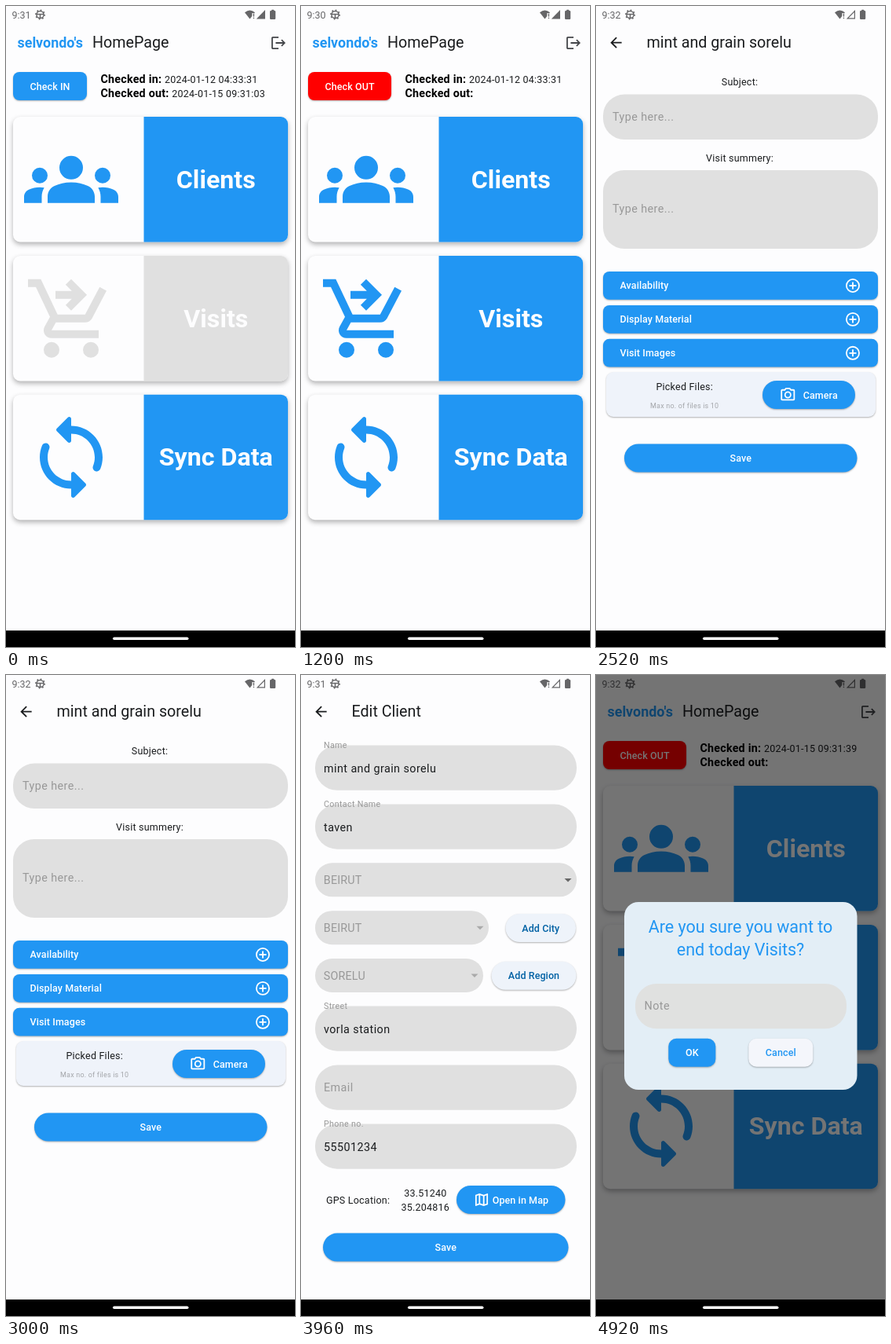
Recreate the animation shown at these times as an HTML page with a canvas. Size 368 px wide and 816 px high, loop 5.16 s.

```html
<!DOCTYPE html>
<html lang="en">
<head>
<meta charset="utf-8">
<title>Client visits app</title>
<style>
  html, body { margin: 0; width: 100%; height: 100%; overflow: hidden; background: #fdfdfe; }
  canvas { display: block; width: 368px; height: 816px; }
</style>
</head>
<body>
<canvas id="stage"></canvas>
<script>
const W = 368, H = 816, NAV_TOP = 795, LOOP = 5160;
const BLUE = '#2196f3', FIELD = '#e0e0e0', PAGE = '#fdfdfe', INK = '#1a1c1e', HINT = '#989898';
const SHOP = 'mint and grain sorelu', CONTACT = 'taven', PHONE = '55501234';

const canvas = document.getElementById('stage');
const ctx = canvas.getContext('2d');
const ratio = window.devicePixelRatio || 1;
canvas.width = W * ratio;
canvas.height = H * ratio;

// Icon outlines on a 24-unit grid
const ICONS = {
  logout: 'M17 7l-1.41 1.41L18.17 11H8v2h10.17l-2.58 2.58L17 17l5-5zM4 5h8V3H4c-1.1 0-2 .9-2 2v14c0 1.1.9 2 2 2h8v-2H4z',
  back: 'M20 11H7.83l5.59-5.59L12 4l-8 8 8 8 1.41-1.41L7.83 13H20z',
  leader: 'M12 12.75c1.63 0 3.07.39 4.24.9 1.08.48 1.76 1.56 1.76 2.73V18H6v-1.61c0-1.18.68-2.26 1.76-2.73 1.17-.52 2.61-.91 4.24-.91zM12 6a3 3 0 0 1 0 6a3 3 0 0 1 0-6z',
  member: 'M4 9a2 2 0 0 1 0 4a2 2 0 0 1 0-4zM5.13 14.1C4.76 14.04 4.39 14 4 14c-.99 0-1.93.21-2.78.58C.48 14.9 0 15.62 0 16.43V18h4.5v-1.61c0-.83.23-1.61.63-2.29z',
  cart: 'M7 18a2 2 0 0 1 0 4a2 2 0 0 1 0-4zM17 18a2 2 0 0 1 0 4a2 2 0 0 1 0-4zM8.1 13h7.45c.75 0 1.41-.41 1.75-1.03L21 4.96 19.25 4l-3.7 7H8.53L4.27 2H1v2h2l3.6 7.59-1.35 2.44C4.52 15.37 5.48 17 7 17h12v-2H7zM12 2l4 4-4 4-1.41-1.41L12.17 7H8V5h4.17l-1.59-1.59z',
  syncHalf: 'M12 4V2.21c0-.45-.54-.67-.85-.35l-2.8 2.79c-.2.2-.2.51 0 .71l2.79 2.79c.32.31.86.09.86-.36V6c3.31 0 6 2.69 6 6 0 .79-.15 1.56-.44 2.25-.15.36-.04.77.23 1.04.51.51 1.37.33 1.64-.34.37-.91.57-1.91.57-2.95 0-4.42-3.58-8-8-8z',
  search: 'M15.5 14h-.79l-.28-.27a6.5 6.5 0 1 0-.7.7l.27.28v.79l5 4.99L20.49 19zM9.5 14a4.5 4.5 0 1 1 0-9a4.5 4.5 0 0 1 0 9z',
  person: 'M19 3H5a2 2 0 0 0-2 2v14a2 2 0 0 0 2 2h14a2 2 0 0 0 2-2V5a2 2 0 0 0-2-2zM19 19H5V5h14zM12 12a3 3 0 1 0 0-6a3 3 0 0 0 0 6zM18 16.6c0-2-4-3.1-6-3.1s-6 1.1-6 3.1V18h12z',
  add: 'M13 7h-2v4H7v2h4v4h2v-4h4v-2h-4zM12 2a10 10 0 1 0 0 20a10 10 0 1 0 0-20zM12 20a8 8 0 1 1 0-16a8 8 0 1 1 0 16z',
  camera: 'M20 4h-3.17L15 2H9L7.17 4H4a2 2 0 0 0-2 2v12a2 2 0 0 0 2 2h16a2 2 0 0 0 2-2V6a2 2 0 0 0-2-2zM20 18H4V6h4.05l1.83-2h4.24l1.83 2H20zM12 7a5 5 0 1 0 0 10a5 5 0 0 0 0-10zM12 15a3 3 0 1 1 0-6a3 3 0 0 1 0 6z',
  map: 'M20.5 3l-.16.03L15 5.1 9 3 3.36 4.9c-.21.07-.36.25-.36.48V20.5c0 .28.22.5.5.5l.16-.03L9 18.9l6 2.1 5.64-1.9c.21-.07.36-.25.36-.48V3.5c0-.28-.22-.5-.5-.5zM10 5.47l4 1.4v11.66l-4-1.4zM5 6.46l3-1.01v11.7l-3 1.16zM19 17.54l-3 1.01V6.86l3-1.16z'
};
for (const name in ICONS) ICONS[name] = new Path2D(ICONS[name]);

function icon(name, cx, cy, color, size = 21.5, transform) {
  ctx.save();
  ctx.translate(cx, cy);
  ctx.scale(size / 24, size / 24);
  if (transform) ctx.transform(...transform);
  ctx.translate(-12, -12);
  ctx.fillStyle = color;
  ctx.fill(ICONS[name], 'evenodd');
  ctx.restore();
}

// Text styles: [size, weight, letter spacing]
const BODY = [12.5, 400, 0.22], BOLD = [14.3, 700, 0.22], INPUT = [14.3, 400, 0.45],
  PLAIN = [14.3, 400, 0.2], BUTTON = [12.5, 500, 0.09], TITLE = [19.7, 400, 0],
  LABEL = [10.7, 400, 0.34];

function text(str, x, y, [size, weight, spacing], color = INK, align = 'left') {
  ctx.font = `${weight} ${size}px Roboto, sans-serif`;
  ctx.letterSpacing = spacing + 'px';
  ctx.textAlign = align;
  ctx.fillStyle = color;
  ctx.fillText(str, x, y);
  return ctx.measureText(str).width;
}

function box(x, y, w, h, r, color, shadow = 0) {
  ctx.save();
  if (shadow) {
    ctx.shadowColor = 'rgba(0,0,0,.3)';
    ctx.shadowBlur = shadow * 2 * ratio;
    ctx.shadowOffsetY = shadow * ratio;
  }
  ctx.fillStyle = color;
  ctx.beginPath();
  ctx.roundRect(x, y, w, h, r);
  ctx.fill();
  ctx.restore();
}

function shape(color, points) {
  ctx.fillStyle = color;
  ctx.beginPath();
  points.forEach(([x, y]) => ctx.lineTo(x, y));
  ctx.closePath();
  ctx.fill();
}

function button(label, x, y, w, { r = 18, fill = BLUE, color = '#fff', shadow = 1 } = {}) {
  box(x, y, w, 36, r, fill, shadow);
  text(label, x + w / 2, y + 22.5, BUTTON, color, 'center');
}

function iconButton(name, label, x, y, w, iconX, labelX) {
  box(x, y, w, 36, 18, BLUE, 1);
  icon(name, iconX, y + 18, '#fff');
  text(label, labelX, y + 22.5, BUTTON, '#fff');
}

const dropArrow = (x, y, color) => shape(color, [[x - 4.5, y - 2.2], [x + 4.5, y - 2.2], [x, y + 2.3]]);

function statusBar(time, fullSignal) {
  const gray = '#666668';
  text(time, 7.5, 16, [12.5, 400, 0], gray);
  ctx.strokeStyle = gray;
  ctx.lineWidth = 1.5;
  ctx.beginPath();
  ctx.arc(43.5, 11, 4.6, 0, 7);
  ctx.moveTo(39, 10.5); ctx.lineTo(48, 10.5);
  ctx.moveTo(43.5, 11); ctx.lineTo(43.5, 15.5);
  ctx.stroke();
  ctx.lineWidth = 1.6;
  ctx.setLineDash([1.7, 2.7]);
  ctx.beginPath();
  ctx.arc(43.5, 11, 5.7, 0, 2 * Math.PI);
  ctx.stroke();
  ctx.setLineDash([]);

  ctx.fillStyle = gray;
  ctx.beginPath();
  ctx.moveTo(310.5, 16.5);
  ctx.lineTo(304, 8.2);
  ctx.quadraticCurveTo(310.5, 3, 317, 8.2);
  ctx.fill();
  box(313.4, 9, 4, 8, 0, PAGE);
  box(314.8, 9.5, 1.3, 4, 0, gray);
  box(314.8, 14.7, 1.3, 1.4, 0, gray);

  shape(gray, [[330, 5], [330, 16.5], [318.8, 16.5]]);
  if (!fullSignal) shape(PAGE, [[328.8, 8], [328.8, 15.3], [321.7, 15.3]]);
  box(336, 6, 7.2, 11, 1.2, gray);
  box(338, 4.8, 3.2, 2, 0.4, gray);
}

function navBar() {
  box(0, NAV_TOP, W, H - NAV_TOP, 0, '#000');
  box(136, 803.4, 96.5, 3.6, 1.8, '#fff');
}

function pageHead(title) {
  icon('back', 25.5, 46.7, INK);
  text(title, 64.5, 53.2, TITLE);
}

function menuCard(y, label, color, drawIcon) {
  box(9, y, 350, 159.5, 9, PAGE, 3);
  box(175.5, y, 183.5, 159.5, [0, 9, 9, 0], color);
  text(label, 267.3, y + 90.7, [32.2, 700, 0], PAGE, 'center');
  drawIcon(83, y + 79.8, color);
}

function groupIcon(x, y, color) {
  icon('leader', x, y, color, 120);
  icon('member', x, y, color, 120);
  icon('member', x, y, color, 120, [-1, 0, 0, 1, 0, 0]);
}

function syncIcon(x, y, color) {
  icon('syncHalf', x, y, color, 120);
  icon('syncHalf', x, y, color, 120, [-1, 0, 0, -1, 0, 0]);
}

function stamp(label, value, x, y) {
  const w = text(label + ' ', x, y, BOLD, '#000');
  text(value, x + w, y, BODY);
}

function home({ time, working, checkedIn, checkedOut = '', fullSignal }) {
  statusBar(time, fullSignal);
  const w = text("selvondo's", 14.5, 53, [17.9, 700, 0], BLUE);
  text('HomePage', Math.max(110, 14.5 + w + 5), 53.2, TITLE);
  icon('logout', 347, 47, '#44464a');
  if (working) button('Check OUT', 9, 84, 106, { r: 8, fill: '#f00' });
  else button('Check IN', 9, 84, 94, { r: 8 });
  const x = working ? 132.5 : 120.5;
  stamp('Checked in:', checkedIn, x, 97.7);
  stamp('Checked out:', checkedOut, x, 115.7);
  menuCard(141, 'Clients', BLUE, groupIcon);
  menuCard(318, 'Visits', working ? BLUE : FIELD, (cx, cy, c) => icon('cart', cx, cy, c, 120));
  menuCard(494.7, 'Sync Data', BLUE, syncIcon);
}

const CLIENTS = [
  [19761, SHOP, CONTACT, 'BEIRUT', PHONE, 1],
  [19760, "dera's shop", 'zeno malt', 'BEIRUT', '55501187', 1],
  [19759, 'le brambolier', 'dovim Al torsen', 'BEIRUT', '55501462', 1],
  [19756, 'tobrin shop', 'milsa', 'BEIRUT', '55501093', 3],
  [19755, 'bena torlo.co', 'hazrel torlo', 'BAABDA', '55501348', 1]
];

function clientCard([id, name, contact, city, phone, status], i) {
  const y = 192 + i * 132;
  box(9, y, 350, 115.3, 9, PAGE, 2.5);
  icon('person', 41, y + 49.3, INK);
  text(id, 41.3, y + 73.7, BODY, INK, 'center');
  text(name, 72, y + 19, BOLD, '#000');
  text('Contact: ' + contact, 72, y + 45, BOLD, '#000');
  text('Location: ' + city, 71.5, y + 71, BODY);
  text('Phone no.: ' + phone, 71.5, y + 89, BODY);
  text('Status: ' + status, 71.5, y + 106.7, BODY);
  ctx.strokeStyle = BLUE;
  ctx.lineWidth = 2.2;
  ctx.beginPath();
  ctx.moveTo(339.8, y + 50);
  ctx.lineTo(348, y + 58.5);
  ctx.lineTo(339.8, y + 67);
  ctx.stroke();
}

function clientList() {
  statusBar('9:31', true);
  pageHead('Clients Page');
  button('Add Client', 249, 29, 101);
  box(9, 81, 350, 51.3, 25.6, FIELD);
  box(13, 84.7, 43.5, 43.5, 21.8, BLUE);
  icon('search', 35, 106.5, '#fff', 18);
  text('Search here...', 61, 111.5, PLAIN, '#5c5c5c');
  text('Sort By', 257.3, 167.3, PLAIN, '#666');
  dropArrow(339.5, 163, '#666');
  CLIENTS.forEach(clientCard);
}

function visitForm() {
  statusBar('9:32', false);
  pageHead(SHOP);
  text('Subject:', 183, 101, BODY, INK, 'center');
  box(9, 112.6, 350, 57.4, 27, FIELD);
  text('Type here...', 21, 146, INPUT, HINT);
  text('Visit summery:', 183, 197.5, BODY, INK, 'center');
  box(9, 209, 350, 100, 27, FIELD);
  text('Type here...', 21, 263.2, INPUT, HINT);
  ['Availability', 'Display Material', 'Visit Images'].forEach((label, i) => {
    const y = 338 + i * 42.9;
    box(9, y, 350, 35.8, 8, BLUE, 1);
    text(label, 30.5, y + 22.3, BUTTON, '#fff');
    icon('add', 327, y + 18, '#fff');
  });
  box(13, 466, 343, 57, 9, '#eff3fa', 1);
  text('Picked Files:', 112.7, 489, BODY, INK, 'center');
  text('Max no. of files is 10', 112.7, 511.8, [8.95, 400, 0.22], '#a4a6aa', 'center');
  iconButton('camera', 'Camera', 212, 477, 118, 244.3, 263.7);
  button('Save', 36, 557.5, 296.5);
}

function input(y, label, value) {
  box(18, y, 333, 57.2, 28, FIELD);
  if (value) {
    text(label, 29, y + 3.7, LABEL, HINT);
    text(value, 29, y + 34, INPUT);
  } else {
    text(label, 29, y + 33.2, INPUT, HINT);
  }
}

function dropdown(y, w, value, arrowColor) {
  box(18, y, w, 43, 21.5, FIELD);
  text(value, 28.8, y + 26.7, PLAIN, HINT);
  dropArrow(18 + w - 11, y + 21.8, arrowColor);
}

function editClient() {
  const tonal = { fill: '#eef3fa', color: '#0061a4' };
  statusBar('9:31', false);
  pageHead('Edit Client');
  input(89.6, 'Name', SHOP);
  input(164.5, 'Contact Name', CONTACT);
  dropdown(239.3, 333, 'BEIRUT', '#666');
  dropdown(300.2, 221, 'BEIRUT', '#aaa');
  dropdown(361, 214, 'SORELU', '#aaa');
  button('Add City', 260.5, 304, 89.5, tonal);
  button('Add Region', 242.5, 364.8, 108, tonal);
  input(421.5, 'Street', 'vorla station');
  input(496.5, 'Email');
  input(571.5, 'Phone no.', PHONE);
  text('GPS Location:', 32, 672.5, BODY);
  text('33.51240', 158.3, 663.5, BODY, INK, 'center');
  text('35.204816', 158.3, 681.5, BODY, INK, 'center');
  iconButton('map', 'Open in Map', 198, 650, 138.5, 230, 243.7);
  button('Save', 28, 710.6, 312.5);
}

function endDialog() {
  home({ time: '9:32', working: true, checkedIn: '2024-01-15 09:31:39' });
  box(0, 0, W, NAV_TOP, 0, 'rgba(0,0,0,.54)');
  box(36, 289, 296.5, 239, 18, '#e3eef6');
  text('Are you sure you want to', 184, 328.3, [21.5, 400, 0], BLUE, 'center');
  text('end today Visits?', 184, 356.8, [21.5, 400, 0], BLUE, 'center');
  box(50, 393, 269, 57.2, 27, '#e0e1e0');
  text('Note', 61.5, 426.2, INPUT, HINT);
  button('OK', 92.3, 462.7, 60, { r: 10 });
  button('Cancel', 194.3, 462.7, 82, { r: 10, fill: '#f4f6fb', color: BLUE });
}

const SCREENS = [
  [0, () => home({ time: '9:31', checkedIn: '2024-01-12 04:33:31', checkedOut: '2024-01-15 09:31:03', fullSignal: true })],
  [840, () => home({ time: '9:30', working: true, checkedIn: '2024-01-12 04:33:31', fullSignal: true })],
  [1680, clientList],
  [2520, visitForm],
  [3480, editClient],
  [4320, endDialog]
];

const begin = performance.now();

function tick() {
  const t = (performance.now() - begin) % LOOP;
  const [, draw] = SCREENS.findLast(([start]) => t >= start);
  ctx.setTransform(ratio, 0, 0, ratio, 0, 0);
  box(0, 0, W, H, 0, PAGE);
  draw();
  navBar();
  requestAnimationFrame(tick);
}
tick();
</script>
</body>
</html>
```
